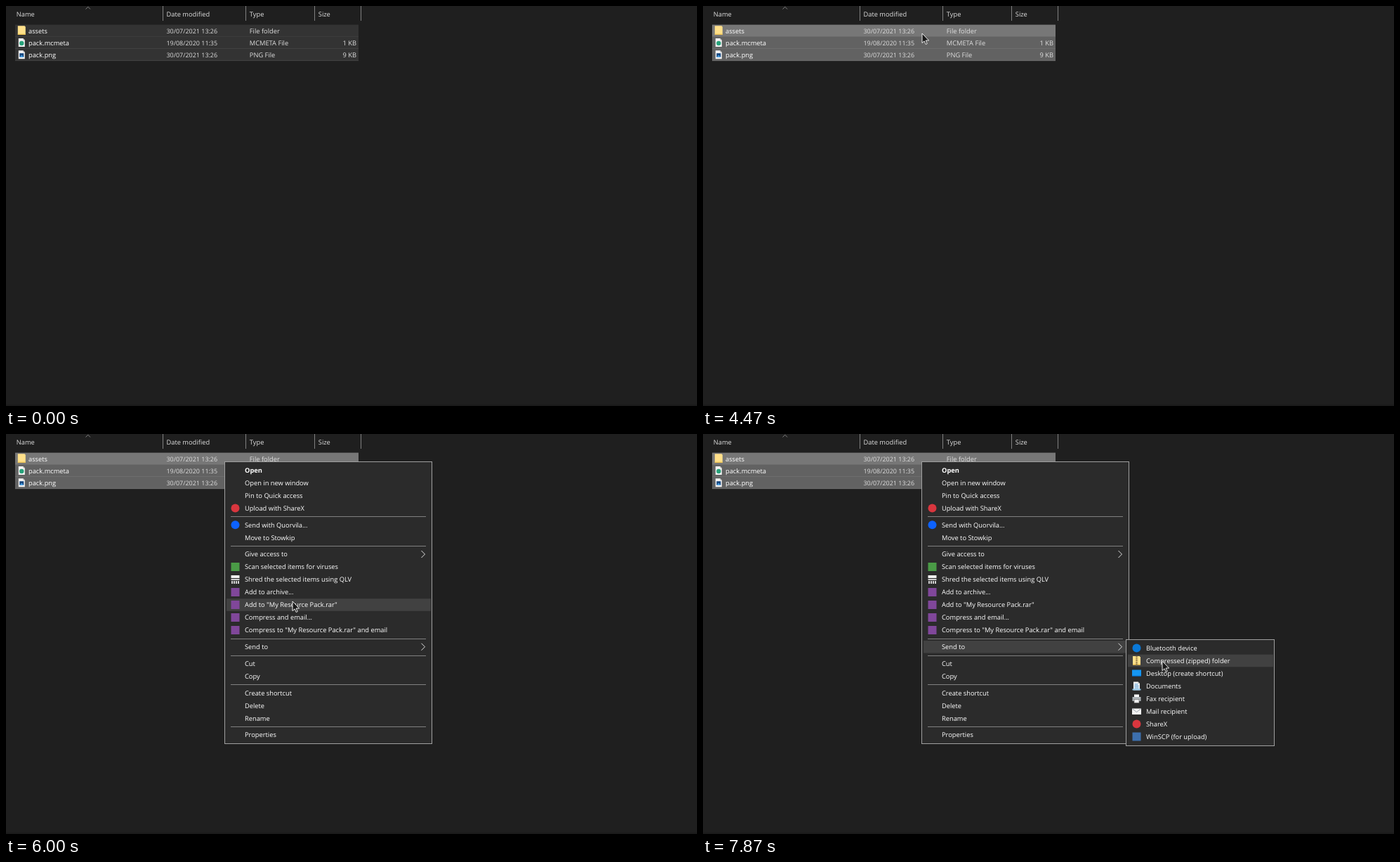
Write an HTML page that moves like this. It is 984 by 569 pixels and loops after 8 s.

```html
<!DOCTYPE html>
<html lang="en">
<head>
<meta charset="utf-8">
<title>Sending files to a zipped folder</title>
<style>
  html, body { margin: 0; width: 100%; height: 100%; overflow: hidden; background: #1f1f1f; }
  svg { display: block; width: 100vw; height: 100vh; }
  text { font: 9.3px "Open Sans", "Noto Sans", sans-serif; fill: #fff; text-rendering: geometricPrecision; white-space: pre; }
  .detail { fill: #dedede; }
  .date { font-size: 8.95px; }
  .bold { font-weight: 700; }
  .end { text-anchor: end; }
  .line { fill: none; stroke: #808080; }
  .panel { fill: #2b2b2b; stroke: #a0a0a0; }
  .lit { fill: #414141; }
</style>
</head>
<body>
<svg id="stage" viewBox="0 0 984 569" preserveAspectRatio="none"></svg>
<script>
const LOOP = 8000, TICKS_PER_MS = 0.015;

const rect = (x, y, w, h, attrs) => `<rect x="${x}" y="${y}" width="${w}" height="${h}" ${attrs}/>`;
const path = (d, attrs) => `<path d="${d}" ${attrs}/>`;
const label = (x, middle, text, cls = "") => `<text x="${x}" y="${middle + 3.4}" class="${cls}">${text}</text>`;

// Icons are drawn around their own centre.
const disc = color => `<circle r="6" fill="${color}"/>`;
const square = color => rect(-6, -6, 12, 12, `fill="${color}"`);
const page = inner => path("M-4.5-6H2L4.5-3.5V6H-4.5Z", 'fill="#f4f4f4"') + path("M2-6V-3.5H4.5Z", 'fill="#b8b8b8"') + inner;
const folder = path("M-5.5-6.5H4.5V-5.5H5.5V6H-5.5Z", 'fill="#ffe08a"') + path("M-5.5 6L5.5 6V4.8H-5.5Z", 'fill="#f0c24b"');
const icons = {
  folder,
  meta: page('<circle cy="1" r="3.2" fill="#27a27a"/>'),
  image: page(rect(-3, -2, 6, 5.5, 'fill="#17477f"') + path("M-3 3.5L0 0.5L3 3.5Z", 'fill="#49a3e8"')),
  share: disc("#d9363e"),
  cloud: disc("#0d62ff"),
  scan: square("#4a9b46"),
  shred: rect(-6, -6, 12, 4, 'fill="#f0f0f0"') + rect(-6, -1, 12, 2, 'fill="#d0d0d0"') +
    path("M-4.5 2V6M-1.5 2V6M1.5 2V6M4.5 2V6", 'stroke="#eee" stroke-width="1.7"'),
  archive: square("#80479a"),
  radio: disc("#0a78d7"),
  zip: folder + path("M0-6V6", 'stroke="#7c6a3d" stroke-width="2.4" stroke-dasharray="1.5 1"'),
  desktop: rect(-6.5, -5, 13, 9.5, 'fill="#1596f2"') + rect(-6.5, 3.3, 13, 1.2, 'fill="#0b5ca8"'),
  document: page(path("M-3-2.5H2M-3 0H3M-3 2.5H3", 'stroke="#3b8ed0" stroke-width="1.2"')) +
    rect(-6, 4, 12, 2, 'fill="#8fc5e8"'),
  printer: rect(-3.5, -6, 7, 4, 'fill="#fff"') + rect(-6, -2.5, 12, 6, 'fill="#aeb4b8"') +
    rect(-3.5, 1, 7, 5, 'fill="#eee" stroke="#666" stroke-width=".6"'),
  mail: rect(-6.5, -4, 13, 8.5, 'fill="#f3f3f3"') + path("M-6-3.5L0 1L6-3.5", 'fill="none" stroke="#9aa3ab"'),
  upload: square("#3d70ae")
};
const icon = (name, x, y) => `<g transform="translate(${x} ${y})">${icons[name]}</g>`;

// Explorer list
const files = [
  ["folder", "assets", "30/07/2021 13:26", "File folder", ""],
  ["meta", "pack.mcmeta", "19/08/2020 11:35", "MCMETA File", "1 KB"],
  ["image", "pack.png", "30/07/2021 13:26", "PNG File", "9 KB"]
];
const rowTop = i => 26.6 + i * 17.2;
const header = ["Name", "Date modified", "Type", "Size"]
  .map((text, i) => label([14.8, 228.5, 346.8, 444.8][i], 11.6, text, "detail")).join("") +
  path("M223.5 0V21M341.5 0V21M439.5 0V21M505.5 0V21", 'class="line"') +
  path("M113.5 4.5L116.8 1.2L120 4.5", 'class="line"');
const list = files.map(([kind, name, date, type, size], i) => {
  const middle = rowTop(i) + 8.5;
  return rect(13, rowTop(i), 489, 17.2, `id="file${i}"`) +
    path(`M13 ${Math.round(rowTop(i) + 17.2) - .5}H502`, 'stroke="#fff" stroke-opacity=".07"') +
    icon(kind, 22.3, middle - .3) +
    label(32, middle, name) + label(228.5, middle, date, "detail date") +
    label(346.8, middle, type, "detail") + label(499, middle, size, "detail end");
}).join("");

// Context menus; an empty entry is a separator
const mainItems = [
  ["Open"], ["Open in new window"], ["Pin to Quick access"], ["Upload with ShareX", "share"], [],
  ["Send with Quorvila...", "cloud"], ["Move to Stowkip"], [],
  ["Give access to"], ["Scan selected items for viruses", "scan"],
  ["Shred the selected items using QLV", "shred"], ["Add to archive...", "archive"],
  ['Add to "My Resource Pack.rar"', "archive"], ["Compress and email...", "archive"],
  ['Compress to "My Resource Pack.rar" and email', "archive"], [],
  ["Send to"], [], ["Cut"], ["Copy"], [],
  ["Create shortcut"], ["Delete"], ["Rename"], [], ["Properties"]
];
const subItems = [
  ["Bluetooth device", "radio"], ["Compressed (zipped) folder", "zip"],
  ["Desktop (create shortcut)", "desktop"], ["Documents", "document"],
  ["Fax recipient", "printer"], ["Mail recipient", "mail"],
  ["ShareX", "share"], ["WinSCP (for upload)", "upload"]
];

function buildMenu(id, left, top, width, height, items) {
  const rows = [];
  let y = top + 3, body = "";
  for (const [text, kind] of items) {
    if (!text) {
      body += path(`M${left + 8.5} ${Math.round(y + 2.9) + .5}H${left + width - 8.5}`, 'class="line"');
      y += 5.75;
      continue;
    }
    const middle = y + 9;
    rows.push({ text, y });
    body += label(left + 28.5, middle, text, text === "Open" ? "bold" : "");
    if (kind) body += icon(kind, left + 15, middle);
    if (text === "Give access to" || text === "Send to")
      body += path(`M${left + 280} ${middle - 5}l5 5l-5 5`, 'fill="none" stroke="#e0e0e0"');
    y += 18;
  }
  const lit = rows.map((row, i) =>
    rect(left + 2.5, row.y + .2, width - 4, 17.6, `class="lit" id="${id}${i}"`)).join("");
  const svg = `<g id="${id}">` + rect(left, top, width, height, 'class="panel"') + lit + body + "</g>";
  return { rows, svg };
}
const mainMenu = buildMenu("main", 311.5, 39.5, 295, 401, mainItems);
const subMenu = buildMenu("sub", 602.5, 292.5, 211, 151, subItems);

const stage = document.getElementById("stage");
stage.innerHTML = rect(0, 0, 984, 569, 'fill="#1f1f1f"') + rect(0, 567, 984, 2, 'fill="#1a1a1a"') +
  header + list +
  rect(219.5, 0, 0, 0, 'id="marquee" fill="#0078d7" fill-opacity=".3" stroke="#0078d7"') +
  mainMenu.svg + subMenu.svg +
  path("M0 0V13.6L3.1 10.8L5.2 15.5L7.2 14.6L5.2 10H9.6Z", 'id="pointer" fill="#181818" stroke="#fff" stroke-width=".9"');

const set = (id, attrs) => {
  const node = document.getElementById(id);
  for (const key in attrs) node.setAttribute(key, attrs[key]);
};
const show = (id, visible) => set(id, { visibility: visible ? "inherit" : "hidden" });

// Pointer path: time, x, y
const track = [
  [3200, 237, 39], [3533, 286, 34], [3600, 286, 34], [3667, 293, 32], [4000, 311, 39],
  [4400, 311, 39], [4467, 312, 39], [5067, 312, 39], [5133, 313, 40], [5200, 313, 40],
  [5733, 402, 124], [6067, 409, 267], [6400, 409, 307], [6800, 409, 307],
  [7133, 540, 287], [7267, 600, 291], [7467, 646, 314], [7533, 646, 314],
  [7667, 653, 322], [7800, 653, 322], [7867, 654, 323]
];
function pointerAt(t) {
  const next = track.findIndex(key => key[0] > t);
  if (next < 0) return track.at(-1).slice(1);
  if (next === 0) return track[0].slice(1);
  const [a, b] = [track[next - 1], track[next]];
  const k = (t - a[0]) / (b[0] - a[0]);
  return [1, 2].map(i => Math.round(a[i] + (b[i] - a[i]) * k));
}
const fade = (t, start) => Math.min(1, Math.max(0, (t - start + 70) / 267));

function render(ms) {
  const t = Math.floor((ms + 4) * TICKS_PER_MS) / TICKS_PER_MS;
  const active = t >= 3199, dragging = active && t < 4130;
  const [x, y] = pointerAt(t);

  const firstSelected = t >= 3260;
  files.forEach((_, i) => set("file" + i, { fill: !active ? "#333" : i ? "#626262" : "#777", stroke: "none" }));
  if (active && !firstSelected) set("file0", { fill: "#1f1f1f", stroke: "#6a6a6a" });

  show("marquee", dragging);
  if (dragging) set("marquee", { y: y + .5, width: x - 220, height: 112 - y });

  const mainOpacity = fade(t, 4733), subOpacity = fade(t, 6667);
  set("main", { opacity: mainOpacity });
  set("sub", { opacity: subOpacity });

  const inSub = subOpacity > 0 && x > 602 && y > 292;
  const under = row => y >= row.y && y < row.y + 18;
  mainMenu.rows.forEach((row, i) => show("main" + i, inSub ? row.text === "Send to" : under(row)));
  subMenu.rows.forEach((row, i) => show("sub" + i, inSub && under(row)));

  show("pointer", active);
  set("pointer", { transform: `translate(${x} ${y})` });
}

function loop() {
  render(performance.now() % LOOP);
  requestAnimationFrame(loop);
}
loop();
</script>
</body>
</html>
```
